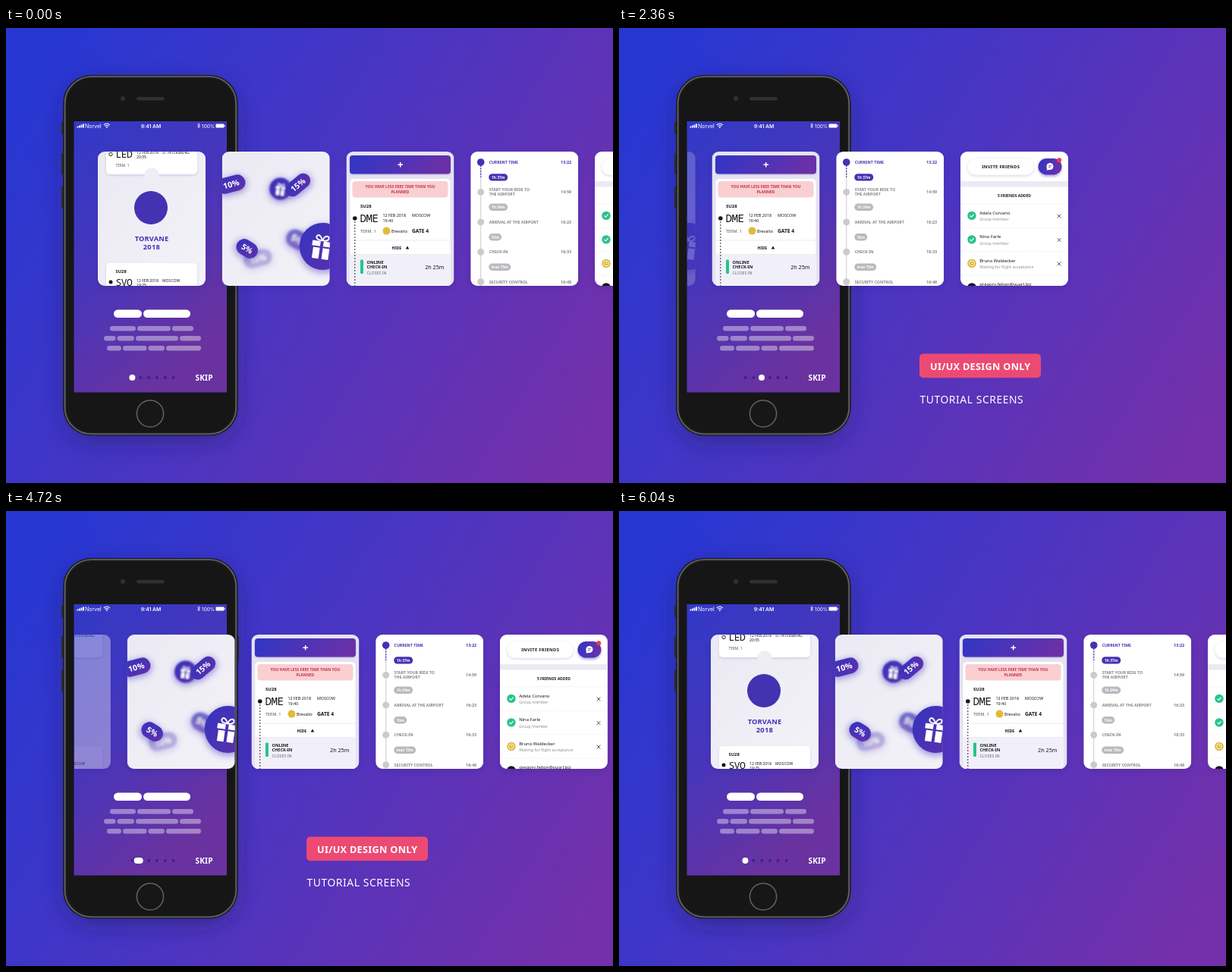
An HTML page for the animation above (6080 ms loop, 800 by 600 pixels).

```html
<!DOCTYPE html>
<html lang="en">
<head>
<meta charset="utf-8">
<title>Tutorial screens</title>
<style>
html, body { margin: 0; width: 100%; height: 100%; overflow: hidden; background: #4636c2; }
svg { display: block; width: 800px; height: 600px; }
text { font-family: "Noto Sans", "Open Sans", sans-serif; white-space: pre; }
.code { font-family: "Noto Sans Mono", "DejaVu Sans Mono", monospace; letter-spacing: -.5px; }
.bar { font-family: Inter, Roboto, sans-serif; }
</style>
</head>
<body>
<svg id="stage" viewBox="0 0 800 600" xmlns="http://www.w3.org/2000/svg"></svg>
<script>
const LOOP = 6080, PITCH = 163.75, SWIPE = 163, DOT_STEP = 10.8;
const INK = '#17161c', GREY = '#85838b', VIOLET = '#4332b2', MINT = '#29c487';

const rect = (x, y, w, h, r, fill, more = '') =>
  `<rect x="${x}" y="${y}" width="${w}" height="${h}" rx="${r}" fill="${fill}" ${more}/>`;
const disc = (x, y, r, fill, more = '') =>
  `<circle cx="${x}" cy="${y}" r="${r}" fill="${fill}" ${more}/>`;
const path = (d, stroke, width, more = '') =>
  `<path d="${d}" fill="none" stroke="${stroke}" stroke-width="${width}" ${more}/>`;
const text = (x, y, str, size, weight = 400, fill = INK, more = '') =>
  `<text x="${x}" y="${y}" font-size="${size}" font-weight="${weight}" fill="${fill}" ${more}>${str}</text>`;
const MID = 'text-anchor="middle"', END = 'text-anchor="end"';

const gradient = (id, x2, y2, ...stops) =>
  `<linearGradient id="${id}" x1="0" y1="0" x2="${x2}" y2="${y2}">` +
  stops.map((c, i) => `<stop offset="${i / (stops.length - 1)}" stop-color="${c}"/>`).join('') +
  '</linearGradient>';
const blur = (id, s) =>
  `<filter id="${id}" x="-60%" y="-60%" width="220%" height="220%"><feGaussianBlur stdDeviation="${s}"/></filter>`;

const defs = `<defs>
  <linearGradient id="sky" gradientUnits="userSpaceOnUse" x1="40" y1="60" x2="780" y2="520">
    <stop offset="0" stop-color="#2737d2"/><stop offset=".45" stop-color="#4935c2"/>
    <stop offset="1" stop-color="#7430aa"/></linearGradient>
  ${gradient('screen', .5, 1, '#3139c7', '#4736bb', '#6a329f')}
  ${gradient('brand', 1, .15, '#2f36c6', '#6a30a8')}
  ${gradient('coin', 1, .8, '#3434bf', '#5c30ac')}
  ${gradient('paper', 1, 1, '#ebeaf3', '#f3f2f8')}
  ${blur('haze', 1)}${blur('soft', 1.6)}${blur('shade', 4)}${blur('deep', 15)}
  <clipPath id="round"><rect width="142" height="177" rx="9"/></clipPath>
  <clipPath id="reach"><rect x="90" y="0" width="710" height="600"/></clipPath>
</defs>`;

function phone() {
  const bars = [0, 1, 2, 3].map(i => rect(93.5 + i * 2.5, 129.6 - i * 1.1, 1.8, 2 + i * 1.1, .4, '#fff')).join('');
  const wifi = path('M128.8 127.8q4-3.6 8 0M130.4 129.5q2.4-2 4.8 0', '#fff', 1.1) + disc(132.8, 131, .9, '#fff');
  const keys = [[124, 16], [165, 28], [209, 29]].map(([y, h]) => rect(73, y, 4, h, 1, '#2c2c30')).join('');
  const pills = [
    [371.5, 10.5, 1, 142, 37, 181, 62],
    [393, 6.5, .4, 137, 34, 173, 44, 219, 28],
    [406, 6.5, .4, 129, 15.5, 146.5, 22.5, 171, 56, 229, 28],
    [419, 6.5, .4, 133, 19, 154, 31.5, 187.5, 21.5, 211, 46]
  ].map(([y, h, a, ...xs]) => {
    let row = '';
    for (let i = 0; i < xs.length; i += 2) row += rect(xs[i], y, xs[i + 1], h, h / 2, '#fff', `opacity="${a}"`);
    return row;
  }).join('');
  const dots = [0, 1, 2, 3, 4, 5].map(i => disc(166.6 + i * DOT_STEP, 461, 1.9, '#35248c')).join('');
  return rect(78, 74, 225, 470, 38, '#17154f', 'opacity=".45" filter="url(#deep)"') +
    keys + rect(303, 165, 4, 33, 1, '#2c2c30') +
    rect(75.2, 62, 230.4, 475.6, 37, '#1c1c1e') +
    rect(77.6, 64.2, 225.6, 471.2, 35, '#1a1a1b', 'stroke="#626265" stroke-width="1.8"') +
    rect(80.5, 67, 219.8, 465.6, 32.5, '#161617') +
    disc(154, 93, 3.6, '#26262b') + disc(154, 93, 1.8, '#34345a') +
    rect(172, 91, 37, 4.5, 2.2, '#303033') +
    disc(190, 508.5, 17.6, '#171718', 'stroke="#626265" stroke-width="1.5"') +
    rect(89.5, 123, 201.5, 357.5, 0, 'url(#screen)') +
    bars + wifi +
    text(104, 131.8, 'Norvel', 7, 400, '#fff', 'class="bar"') +
    text(191, 131.6, '9:41 AM', 6.8, 600, '#fff', 'class="bar" text-anchor="middle"') +
    path('M252.4 127l3.2 3.2-1.6 1.6v-6l1.6 1.6-3.2 3.2', '#fff', .7) +
    text(258, 131.6, '100%', 6.5, 400, '#fff', 'class="bar"') +
    rect(276.5, 126.4, 11, 5, 1.2, '#fff') + rect(288, 128, 1, 2, .4, '#fff') +
    pills + dots + rect(162, 457, 8, 8, 4, '#fff', 'id="active"') +
    text(249.5, 465, 'SKIP', 10.1, 700, '#fff', 'letter-spacing=".15"');
}

function ticketCard() {
  const panel = (y, h) => rect(11, y + 1.5, 120, h, 5, '#aaa6cc', 'opacity=".45" filter="url(#soft)"') +
    rect(11, y, 120, h, 5, '#fff');
  const leg = (y, code, hour, town, size) =>
    text(23.5, y, code, 13, 300, INK, 'class="code"') +
    text(51, y - 5.2, '12 FEB 2018', 5.1, 500) + text(51, y + .5, hour, 5.1, 500) +
    text(85, y - 5.2, town, size, 500);
  return rect(0, 0, 142, 177, 0, 'url(#paper)') +
    panel(-12, 42) + disc(71, 31, 9.8, '#efeef5') +
    disc(17, 3.5, 2.2, '#fff', `stroke="${INK}" stroke-width=".9"`) +
    leg(8, 'LED', '20:55', 'ST. PETERSBURG', 4.6) + text(23.5, 19.5, 'TERM. 1', 4.8, 400, '#55535c') +
    disc(70, 74, 22, VIOLET) +
    text(71, 118, 'TORVANE', 9.3, 700, VIOLET, MID + ' letter-spacing=".15"') +
    text(71, 129, '2018', 9.3, 700, VIOLET, MID + ' letter-spacing=".3"') +
    panel(147, 45) + text(23.5, 160, 'SU28', 5.8, 700) +
    disc(17, 172, 2.5, INK) + leg(177, 'SVO', '19:25', 'MOSCOW', 5.1);
}

function gift(x, y, s) {
  return `<g transform="translate(${x} ${y}) rotate(8) scale(${s})" fill="#fff">
    <path d="M-13-8H-2V-1H-13ZM2-8H13V-1H2ZM-11 1H-2V16H-11ZM2 1H11V16H2Z"/>
    ${path('M0-9C-12-8-9-18-4-15Q-1-13 0-9C12-8 9-18 4-15Q1-13 0-9', '#fff', 2)}</g>`;
}

function salesCard() {
  const glow = 'opacity=".5" filter="url(#shade)"';
  const tag = (x, y, w, h, turn, label, more = '') =>
    `<g transform="translate(${x} ${y}) rotate(${turn})" ${more}>` +
    rect(-w / 2 - 1, -h / 2 + 1, w + 2, h + 2, h / 2 + 1, '#4a3cc4', glow) +
    rect(-w / 2, -h / 2, w, h, h / 2, 'url(#coin)') +
    text(0, 3.8, label, 10.5, 700, '#fff', MID) + '</g>';
  return rect(0, 0, 142, 177, 0, 'url(#paper)') +
    tag(99, 116, 30, 24, 30, '5%', 'opacity=".7" filter="url(#soft)"') +
    tag(47, 141, 38, 21, -15, '10%', 'opacity=".35" filter="url(#soft)"') +
    disc(77, 51, 16, '#4a3cc4', glow) +
    `<g filter="url(#haze)">${disc(77, 49, 14.5, 'url(#coin)')}${gift(77, 50, .48)}</g>` +
    tag(12, 43, 38, 21, -15, '10%') + tag(100, 44, 37, 19, -40, '15%') + tag(33, 128, 30, 21, 32, '5%') +
    disc(133, 128, 32, '#4a3cc4', glow) +
    disc(133, 125, 31, 'url(#coin)') + gift(131, 126, .98);
}

function flightCard() {
  const red = '#c92f45';
  return rect(0, 0, 142, 177, 0, '#e5e3f1') +
    rect(5, 7, 132, 23, 4, '#4a34b0', 'opacity=".3" filter="url(#soft)"') +
    rect(4.5, 5, 133, 24.5, 4, 'url(#brand)') + path('M71.2 14v6.6M67.9 17.3h6.6', '#fff', 1.5) +
    rect(5, 36, 132, 160, 5, '#fff') + rect(8, 39, 126, 21.5, 4, '#f9cfd2') +
    text(71, 48.3, 'YOU HAVE LESS FREE TIME THAN YOU', 5, 600, red, MID) +
    text(71, 54.5, 'PLANNED', 5, 600, red, MID) +
    text(18.5, 73.5, 'SU28', 6, 700) + text(18, 92.5, 'DME', 14.2, 300, INK, 'class="code"') +
    text(48, 86, '12 FEB 2018', 5.4, 500) + text(48, 92.6, '19:40', 5.4, 500) +
    text(86.5, 86, 'MOSCOW', 5.3, 500) + text(18.5, 106.8, 'TERM. 1', 5.5, 400, '#55535c') +
    disc(53, 104.6, 5, '#e3b93c') + text(59.5, 107, 'Brevalto', 5.4, 500) + text(86.5, 107, 'GATE 4', 6.7, 700) +
    path('M5 117h132M5 135.5h132', '#e6e4ee', .8) +
    text(60, 128.6, 'HIDE', 5.2, 700) + `<path d="M78.2 128.4L80.5 124.4L82.8 128.4Z" fill="${INK}"/>` +
    rect(5, 136, 132, 50, 0, '#f1f0fa') + rect(18.5, 142.5, 4, 18.5, 1.2, MINT) +
    text(27, 148, 'ONLINE', 5.6, 700) + text(27, 154.4, 'CHECK-IN', 5.6, 700) +
    text(27, 161.5, 'CLOSES IN', 5.3, 400, '#66646c') + text(129, 155, '2h 25m', 7.2, 500, INK, END) +
    disc(11.3, 88, 2.8, INK) + path('M11.3 92V177', INK, .9, 'stroke-dasharray="2 2"');
}

function timeCard() {
  const rows = [
    [14, ['CURRENT TIME'], '13:22', '1h 37m', 25],
    [53.4, ['START YOUR RIDE TO', 'THE AIRPORT'], '14:59', '1h 24m', 25],
    [92.9, ['ARRIVAL AT THE AIRPORT'], '16:23', '10m', 17],
    [132.3, ['CHECK-IN'], '16:33', 'max 15m', 29],
    [171.8, ['SECURITY CONTROL'], '16:48', '', 0]
  ];
  return rect(0, 0, 142, 177, 0, '#fff') + path('M13.5 14V177', '#cbc9d0', 1) +
    path('M13.5 18V34', VIOLET, 1.3, 'stroke-dasharray="2 1.6"') +
    rows.map(([y, lines, hour, wait, w], i) => {
      const tone = i ? GREY : VIOLET, weight = i ? 600 : 700, top = y + (lines[1] ? -1.4 : 2);
      return disc(13.5, y, i ? 4.5 : 4.8, i ? '#cccad0' : VIOLET) +
        lines.map((s, k) => text(24.4, top + k * 6.1, s, 5.2, weight, tone)).join('') +
        text(133, y + 2, hour, 5.5, weight, tone, END) +
        (wait && rect(24, y + 15.2, w, 9.4, 4.7, i ? '#bbb9bf' : VIOLET) +
          text(24 + w / 2, y + 21.7, wait, 4.9, 700, '#fff', MID));
    }).join('');
}

function friendsCard() {
  const people = [
    ['Adela Corvano', 'Group member'],
    ['Nina Farle', 'Group member'],
    ['Bruno Waldecker', 'Waiting for flight acceptance'],
    ['gregory.felton@vuorl.biz', '']
  ];
  const mark = (i, y) => i < 2
    ? disc(15, y, 5.7, MINT) + path(`M12.5 ${y}l1.9 1.9 3.2-3.6`, '#fff', 1.2)
    : i === 2
      ? disc(15, y, 5.7, '#dfb638') + disc(15, y, 3.5, 'none', 'stroke="#fff" stroke-width=".9"') +
        path(`M15 ${y - 2}v2h1.8`, '#fff', .8)
      : disc(15, y, 5.7, INK);
  return rect(0, 0, 142, 177, 0, '#fff') +
    rect(9, 10.5, 88, 22, 11, '#8d89b0', 'opacity=".3" filter="url(#soft)"') +
    rect(9, 9, 88, 22, 11, '#fff', 'stroke="#eae9f0" stroke-width=".5"') +
    text(53.2, 21.7, 'INVITE FRIENDS', 5.8, 700, INK, MID + ' letter-spacing=".3"') +
    rect(102.5, 11, 31, 22, 11, '#4a34b0', 'opacity=".4" filter="url(#soft)"') +
    rect(102.5, 9, 31, 21.5, 10.7, 'url(#brand)') +
    disc(118, 19.5, 4.5, '#fff') + '<path d="M113.8 24.4v-5h4v4.6Z" fill="#fff"/>' +
    path('M116.2 18.7h3.8M116.2 20.6h2.4', VIOLET, .8) + disc(130.2, 11.3, 3, '#e8394f') +
    rect(0, 39, 142, 7.5, 0, '#ebeaf2') + text(71, 59.6, '5 FRIENDS ADDED', 5, 700, INK, MID) +
    people.map(([name, note], i) => {
      const y = 84.4 + i * 31.5;
      return path(`M0 ${y - 15.7}H142`, '#e8e7ed', .7, 'stroke-dasharray="1.5 1"') + mark(i, y) +
        text(25.2, y - 1.8, name, 5.9, 500) + text(25.2, y + 6.6, note, 5.3, 400, '#8f8d95') +
        path(`M127.8 ${y - 1.8}l4.6 4.8m0-4.8l-4.6 4.8`, '#55535c', 1);
    }).join('');
}

const cards = [ticketCard, salesCard, flightCard, timeCard, friendsCard].map(draw =>
  '<g class="card">' + rect(2, 5, 138, 173, 9, '#1d1466', 'opacity=".25" filter="url(#shade)"') +
  `<g clip-path="url(#round)">${draw()}</g></g>`).join('');

const caption = '<g id="caption">' + rect(396, 429.5, 160, 31.8, 5, '#ec4a72') +
  text(410, 451, 'UI/UX DESIGN ONLY', 12.7, 700, '#fff', 'letter-spacing=".3"') +
  text(396.5, 494.8, 'TUTORIAL SCREENS', 13.9, 400, '#fff', 'letter-spacing=".55"') + '</g>';

const stage = document.getElementById('stage');
stage.innerHTML = defs + rect(0, 0, 800, 600, 0, 'url(#sky)') + phone() + caption +
  `<g clip-path="url(#reach)">${cards}</g>`;
const cardNodes = [...stage.querySelectorAll('.card')];
const active = document.getElementById('active');
const captionNode = document.getElementById('caption');

// [time, page]; eased between neighbours
const pages = [
  [0, 0], [600, 0], [1180, 1], [1500, 1], [2080, 2], [2420, 2], [3000, 3],
  [3260, 3], [3840, 4], [4300, 4], [4980, -.15], [5020, -.15], [5640, .003], [LOOP, 0]
];
const fades = [[0, 0], [200, 0], [600, 1], [5400, 1], [5800, 0], [LOOP, 0]];
const ease = p => p < .5 ? 4 * p ** 3 : 1 - 4 * (1 - p) ** 3;
const clamp = v => Math.min(1, Math.max(0, v));

function at(steps, t) {
  const i = steps.findIndex(s => s[0] > t);
  const [t0, a] = steps[i - 1], [t1, b] = steps[i];
  return a + (b - a) * ease((t - t0) / (t1 - t0));
}

function frame() {
  const t = performance.now() % LOOP, page = at(pages, t);
  cardNodes.forEach((node, i) => {
    node.setAttribute('transform', `translate(${121 + i * PITCH - page * SWIPE} 163)`);
    node.setAttribute('opacity', 1 - .78 * clamp(page - i));
  });
  const width = 8 + 6 * Math.sin(Math.PI * clamp(page - Math.floor(Math.max(0, page))));
  active.setAttribute('width', width);
  active.setAttribute('x', 166.4 + page * DOT_STEP - width / 2);
  captionNode.setAttribute('opacity', at(fades, t));
  requestAnimationFrame(frame);
}
frame();
</script>
</body>
</html>
```
